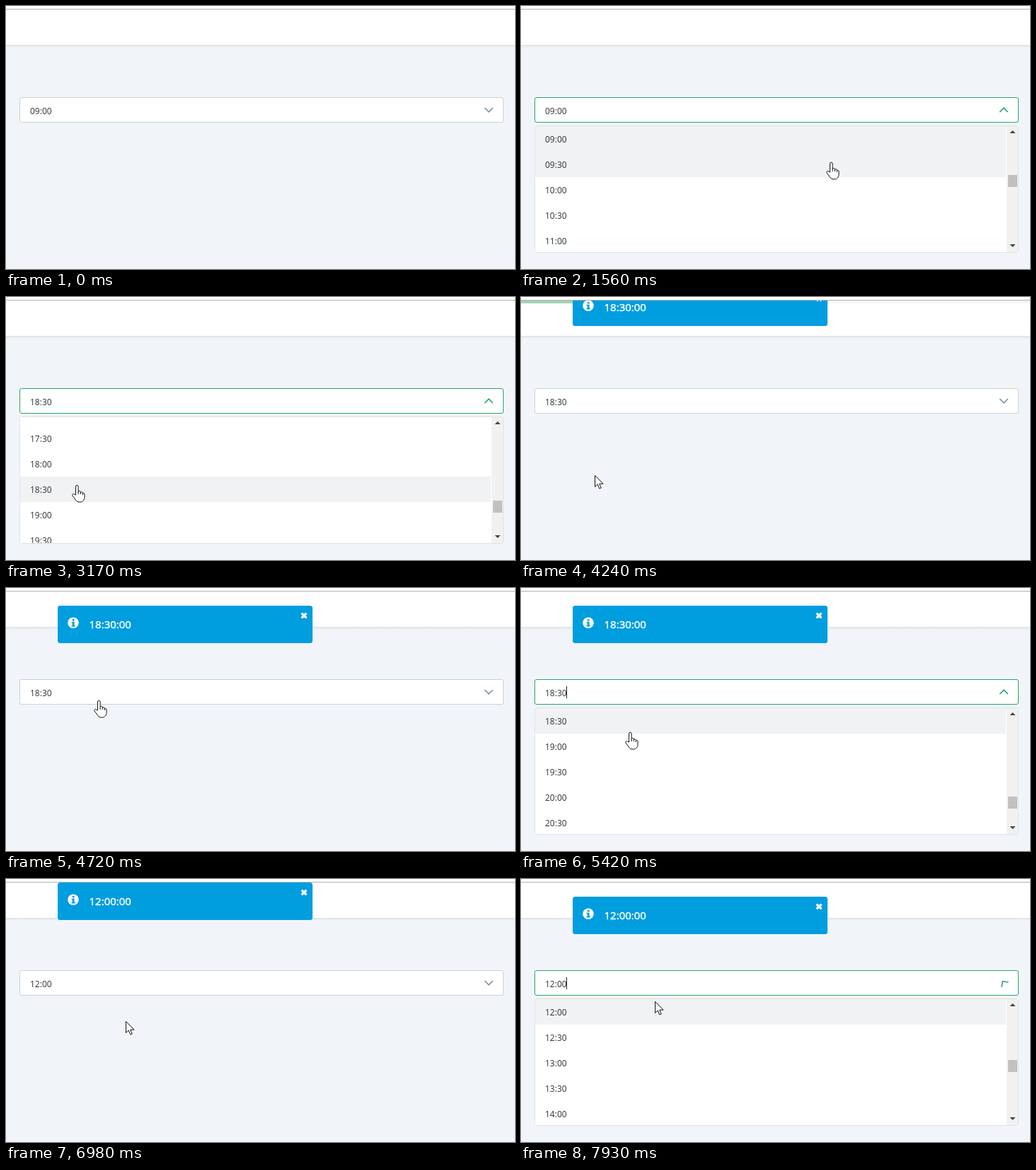
These frames come from a looping animation (719 px wide and 372 px high, 8 s). An HTML page:

```html
<!DOCTYPE html>
<html lang="en">
<head>
<meta charset="utf-8">
<title>Time select</title>
<style>
  html, body { margin: 0; width: 100%; height: 100%; overflow: hidden; background: #f1f5f9; }
  svg { display: block; width: 719px; height: 372px; }
  text { font: 12px "Open Sans", sans-serif; fill: #303336; }
  #toast text { font-size: 15px; fill: #fff; stroke: #fff; stroke-width: .45; }
  #arrow, #hand { fill: #fff; stroke: #111; stroke-linejoin: round; }
</style>
</head>
<body>
<svg viewBox="0 0 719 372">
  <defs>
    <clipPath id="page"><rect y="5" width="719" height="367"/></clipPath>
    <clipPath id="view"><rect x="20" y="170" width="665" height="178"/></clipPath>
    <linearGradient id="shade" x2="0" y2="1">
      <stop stop-color="#dde1e4"/><stop offset="1" stop-color="#f1f5f9"/>
    </linearGradient>
  </defs>
  <rect width="719" height="372" fill="#f1f5f9"/>
  <rect y="55" width="719" height="4" fill="url(#shade)"/>
  <rect width="719" height="55" fill="#fff"/>
  <rect y="4" width="719" height="1" fill="#b1b1b1"/>

  <rect id="field" x="19.5" y="129.5" width="683" height="35" rx="2.5" fill="#fff"/>
  <text id="value" x="34" y="153"></text>
  <rect id="caret" x="64" y="139" width="1" height="17" fill="#222"/>
  <path id="chevron" d="M-5.8-3L0 2.8L5.8-3" fill="none" stroke-width="1.7"/>

  <g id="menu">
    <rect x="19.5" y="169.5" width="683" height="179" rx="2.5" fill="#fff" stroke="#dde3e9"/>
    <g clip-path="url(#view)"><g id="rows"></g></g>
    <rect x="686" y="170" width="16" height="178" fill="#f1f1f1"/>
    <path d="M690.5 180h8l-4-4zM690.5 337h8l-4 4z" fill="#454545"/>
    <rect id="thumb" x="688" width="13" height="17" fill="#c1c1c1"/>
  </g>

  <g clip-path="url(#page)">
    <g id="loader">
      <rect y="5" width="719" height="4" fill="#f6f6f6"/>
      <rect id="bar" y="5" height="4" fill="#a3d5b5"/>
    </g>
    <g id="toast">
      <rect x="73" y="25" width="360" height="53" rx="3.5" fill="#009ddf"/>
      <circle cx="95" cy="49.2" r="7.8" fill="#fff"/>
      <path d="M93.8 44h2.8v2.4h-2.8zM92.6 47.8h4v5h1.2v1.8h-5.2v-1.8h1.2v-3.2h-1.2z" fill="#009ddf"/>
      <text id="note" x="117.5" y="57"></text>
      <path d="M417.6 35.6l6.8 6.8m0-6.8l-6.8 6.8" stroke="#fff" stroke-width="3.2"/>
    </g>
  </g>
  <path id="arrow" d="M.5.5V16.5L4.2 13L6.8 19L9.2 18L6.7 12.2H12z"/>
  <path id="hand" d="M-1.5 14V2a1.8 1.8 0 0 1 3.6 0v7.5c0-1.5 3.2-1.5 3.2.3v1c0-1.5 3-1.4 3 .4v1c0-1.5 2.7-1.2 2.7.8V17c0 4-2.5 7-6 7H3C0 24-2 21-3 19L-6 15c-1-2 1.2-3.2 2.6-1.8zM2.1 9.5V13M5.3 10.8V13M8.3 12.2V14"/>
</svg>
<script>
const LOOP = 8000, LOAD = 3940, ROW = 36, TOP = 170, NOTCH = 100;
const GREEN = [38, 166, 101], EDGE = [200, 209, 217], GREY = [126, 146, 162];

// One use of the select: row shown first, row chosen, wheel notches, key times, pointer stops
const visits = [
  { from: 18, to: 37, notches: 6, open: 1010, wheel: 1860, pick: 3170, note: 4100,
    stops: [[432, 152], [438, 221], [100, 266]] },
  { from: 37, to: 24, notches: -5, open: 5120, wheel: 5650, pick: 6350, note: 6760,
    stops: [[134, 150], [154, 204], [165, 216]] },
  { from: 24, to: 24, notches: 0, open: 7765, wheel: 9000, pick: 9800, note: 9900,
    stops: [[185, 152], [193, 194], [193, 194]] }
];

const $ = id => document.getElementById(id);
const set = (id, k, v) => $(id).setAttribute(k, v);
const show = (id, on) => set(id, 'visibility', on ? 'visible' : 'hidden');
const move = (id, x, y) => set(id, 'transform', `translate(${x} ${y})`);

const ramp = (t, a, b) => Math.min(1, Math.max(0, (t - a) / (b - a)));
const smooth = x => x * x * (3 - 2 * x);
const easeOut = x => 1 - (1 - x) ** 2;
const mix = (a, b, p) => `rgb(${a.map((v, i) => Math.round(v + (b[i] - v) * p))})`;
const sum = f => visits.reduce((s, v) => s + f(v), 0);
const latest = (key, t) => visits.filter(v => v[key] <= t).pop();

const label = i => String(i >> 1).padStart(2, '0') + (i % 2 ? ':30' : ':00');

function add(tag, attrs, text = '') {
  const el = document.createElementNS('http://www.w3.org/2000/svg', tag);
  for (const k in attrs) el.setAttribute(k, attrs[k]);
  el.textContent = text;
  return $('rows').appendChild(el);
}
const rows = Array.from({ length: 48 }, (_, i) => {
  const bg = add('rect', { x: 20, y: i * ROW, width: 665, height: ROW });
  add('text', { x: 34, y: i * ROW + 23 }, label(i));
  return bg;
});

// The pointer glides to the field, the list and the chosen row, then lifts a little
function pointer(t) {
  const p = [446, 274];
  const glide = (to, a, b) => to.forEach((v, i) => p[i] += (v - p[i]) * smooth(ramp(t, a, b)));
  for (const { stops: [field, list, row], open, wheel, pick } of visits) {
    glide(field, open - 830, open - 300);
    glide(list, open + 30, open + 300);
    glide(row, wheel, pick - 140);
    glide([row[0] + 4, row[1] - 14], pick + 460, pick + 620);
  }
  return p.map(Math.round);
}

function drawSelect(t, y) {
  const done = latest('pick', t), pick = done ? done.to : visits[0].from;
  const now = latest('open', t) || visits[0];
  const shown = sum(v => ramp(t, v.open, v.open + 70) - ramp(t, v.pick + 80, v.pick + 170));
  const focus = sum(v => ramp(t, v.open - 300, v.open - 140) - ramp(t, v.pick, v.pick + 180));
  const turn = sum(v => easeOut(ramp(t, v.open, v.open + 300)) - easeOut(ramp(t, v.pick + 80, v.pick + 300)));

  $('value').textContent = label(pick);
  set('field', 'stroke', mix(EDGE, GREEN, focus));
  show('caret', t >= now.open && t < now.pick && (t - now.open) % 1000 < 500);
  set('chevron', 'transform', `translate(682 147) rotate(${180 * turn})`);
  set('chevron', 'stroke', mix(GREY, GREEN, turn));

  const spin = ramp(t, now.wheel, now.wheel + 110 * Math.abs(now.notches));
  const top = Math.round(now.from * ROW + now.notches * NOTCH * spin);
  const hover = y >= TOP ? Math.floor((y - TOP + top) / ROW) : -1;
  set('menu', 'opacity', shown);
  show('menu', shown > 0);
  move('rows', 0, TOP - top);
  rows.forEach((r, i) => r.setAttribute('fill', i === pick || i === hover ? '#f1f2f4' : '#fff'));
  set('thumb', 'y', Math.round(185.5 + top * .0819));
  return shown > 0;
}

function drawToast(t) {
  const sent = latest('note', t), done = latest('pick', t);
  const on = sent && (sent === done || t < done.pick + 150);
  show('toast', on);
  if (on) {
    $('note').textContent = label(sent.to) + ':00';
    move('toast', 0, Math.round(-80 * (1 - easeOut(ramp(t, sent.note, sent.note + 440)))));
  }
  set('bar', 'width', 430 * ramp(t, LOAD, LOAD + 350));
  set('loader', 'opacity', ramp(t, LOAD, LOAD + 80) - ramp(t, LOAD + 360, LOAD + 560));
}

function draw(t) {
  const [x, y] = pointer(t);
  const open = drawSelect(t, y);
  drawToast(t);
  const over = y > 128 && y < 166 || open && y > TOP + 5;
  show('hand', over && t >= 220);
  show('arrow', !over && t >= 220);
  move('hand', x, y);
  move('arrow', x, y);
}

const start = performance.now();
function tick() {
  draw((performance.now() - start) % LOOP);
  requestAnimationFrame(tick);
}
tick();
</script>
</body>
</html>
```
